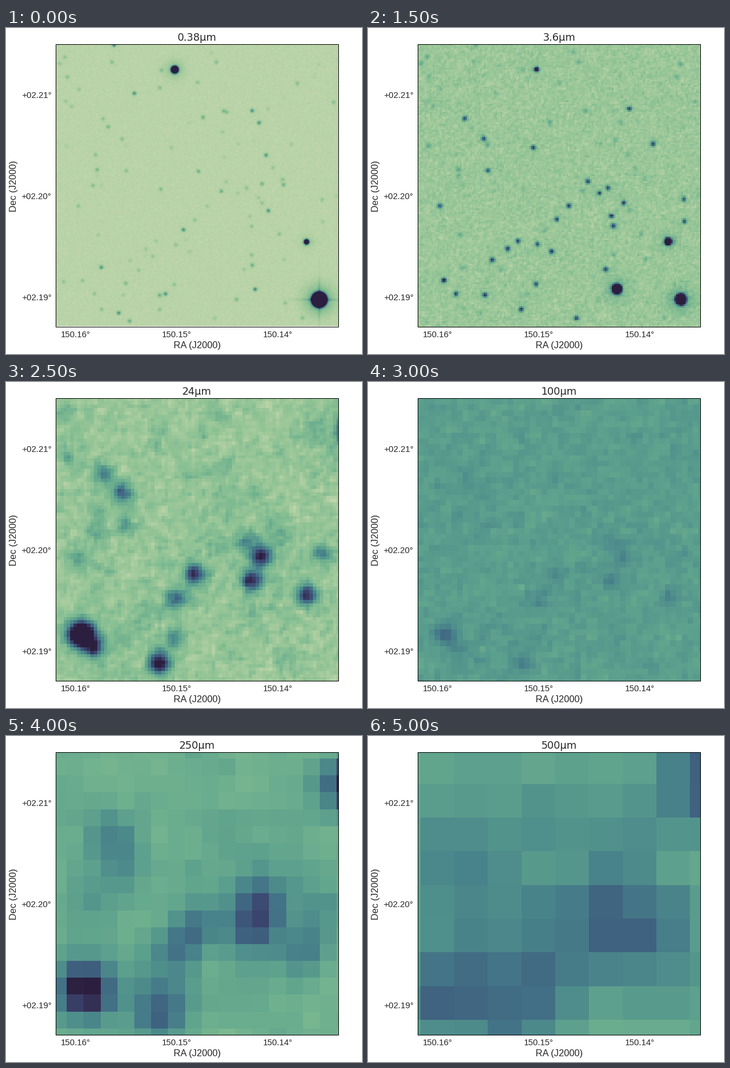
A matplotlib script for the animation above (5500 ms loop, 616 by 564 pixels).

```python
import numpy as np
import matplotlib.pyplot as plt
from matplotlib.animation import FuncAnimation
from matplotlib.colors import ListedColormap
from matplotlib.patches import Rectangle

W, H, DPI = 616, 564, 64
L, T, R, B = 86.5, 28.5, 575.5, 517.5
ANCHOR = 294.5, 287.5  # every detector grid has a cell centred here
INK = "#262626"

# wavelength in µm, cell size in pixels, background level, noise
BANDS = [
    (0.38, 1, .10, .012), (0.77, 1, .11, .015), (2.2, 1, .145, .022),
    (3.6, 2.92, .20, .03), (7.8, 2.92, .32, .095), (24, 5.83, .20, .035),
    (100, 9.72, .45, .02), (160, 14.58, .42, .03), (250, 29.17, .33, .018),
    (350, 40.5, .35, .02), (500, 58.33, .37, .025),
]

# Key objects; brightness is blue for stars, then near infrared, then dust.
STARS = [(541, 470, 40, 10), (519, 370, 2, 3.5), (291, 72, 4.5, 1.7),
         (430, 452, .45, 7), (186, 29, .6, .4)]
BLUE = [(425, 143), (437, 164), (449, 220), (164, 414), (275, 460),
        (306, 349), (453, 316), (221, 113), (194, 493)]
RED = [(285, 207), (493, 201), (380, 266), (400, 286), (347, 308),
       (421, 326), (547, 335), (259, 369), (241, 382), (317, 387),
       (214, 402), (411, 418), (202, 462), (360, 502), (452, 140)]
DUSTY = [(131, 437, 1.7), (152, 460, .6), (265, 487, .88), (290, 444, .3),
         (326, 332, .66), (293, 375, .45), (424, 343, .75), (442, 303, .72),
         (415, 277, .3), (519, 369, .64), (546, 297, .35), (200, 192, .45),
         (167, 157, .3), (207, 247, .25), (124, 308, .25), (606, 84, 2.6)]


def helix_map(start=0.5, rot=-0.75, hue=0.8, light=0.85, dark=0.15):
    x = np.linspace(light, dark, 256)
    amp = hue * x * (1 - x) / 2
    phi = 2 * np.pi * (start / 3 + rot * x)
    mix = np.array([[-0.14861, 1.78277], [-0.29227, -0.90649], [1.97294, 0]])
    rgb = x + amp * (mix @ np.array([np.cos(phi), np.sin(phi)]))
    return ListedColormap(np.clip(rgb.T, 0, 1))


def catalogue(n_faint=60):
    rng = np.random.default_rng(11)
    rows = [(x, y, u, k, 0) for x, y, u, k in STARS]
    rows += [(x, y, .4, .2, 0) for x, y in BLUE]
    rows += [(x, y, .1, 1, 0) for x, y in RED]
    rows += [(x, y, .15, .75, d) for x, y, d in DUSTY]
    for _ in range(n_faint):
        rows.append((rng.uniform(L, R), rng.uniform(T, B),
                     *rng.uniform(.03, (.28, .28, .1))))
    return rows


def flux(lam, u, k, d):
    """Brightness of one object, interpolated along its spectrum."""
    waves = np.log([.38, 2.2, 7.8, 24, 100, 250, 500])
    peaks = [u, k, .17 * k + .6 * d, d, .14 * d, .34 * d, .13 * d]
    return np.interp(np.log(lam), waves, peaks)


def blur(lam):
    """Seeing combined with the diffraction limit of the telescope."""
    mirror = 4 if lam < 3 else .85 if lam < 50 else 3.5
    return np.hypot(2.3, .42 * lam / mirror)


def edges(centre, lo, hi, cell):
    first = centre - (np.ceil((centre - lo) / cell - .5) + .5) * cell
    return first + cell * np.arange(np.ceil((hi - first) / cell) + 1)


def noise(rng, shape, std, passes):
    n = rng.normal(size=shape)
    for _ in range(passes):
        n = n + .35 * (np.roll(n, 1, 0) + np.roll(n, 1, 1))
    return n * std / n.std()


def blob(x, y, cx, cy, peak, s):
    return peak * np.outer(np.exp(-((y - cy) / s) ** 2 / 2),
                           np.exp(-((x - cx) / s) ** 2 / 2))


def spikes(x, y, cx, cy, tilt, peak, length, width=1.5):
    dx, dy = x[None, :] - cx, y[:, None] - cy
    c, s = np.cos(tilt), np.sin(tilt)
    a, b = dx * c + dy * s, dy * c - dx * s
    return sum(peak * np.exp(-abs(p) / length - (q / width) ** 2 / 2)
               for p, q in ((a, b), (b, a)))


def render(lam, cell, level, std):
    trim = 2 if cell == 1 else 0
    ex = edges(ANCHOR[0], 86, 576 - trim, cell)
    ey = edges(ANCHOR[1], 28, 518 - trim, cell)
    x, y = (ex[1:] + ex[:-1]) / 2, (ey[1:] + ey[:-1]) / 2
    sigma = blur(lam)
    rng = np.random.default_rng(int(lam * 100))
    img = level + noise(rng, (len(y), len(x)), std, round(sigma / cell))
    for cx, cy, *spectrum in catalogue():
        peak = flux(lam, *spectrum)
        s = sigma * (1 + .3 * np.log(max(peak, 1)))
        img += blob(x, y, cx, cy, peak, s)
        img += blob(x, y, cx, cy, min(.3, .03 * peak), 3.5 * s)
    if lam < 1:
        img += spikes(x, y, *STARS[0][:2], 0, .4, 18)
    elif lam < 3:
        img += spikes(x, y, *STARS[0][:2], np.pi / 4, 1, 9)
    return img, (ex[0], ex[-1], ey[-1], ey[0])


fig = plt.figure(figsize=(W / DPI, H / DPI), dpi=DPI, facecolor="white")
ax = fig.add_axes([0, 0, 1, 1])
ax.axis("off")


def label(x, y, text, px, font="Liberation Sans", ha="center", **kw):
    return ax.text(x, y, text, fontsize=px * 72 / DPI, family=font, color=INK,
                   ha=ha, va="baseline", **kw)


cmap = helix_map()
images = []
for band in BANDS:
    img, extent = render(*band)
    images.append(ax.imshow(img, extent=extent, cmap=cmap, vmin=0, vmax=1,
                            interpolation="nearest", aspect="auto",
                            visible=False))
ax.set_xlim(0, W)
ax.set_ylim(H, 0)

border = Rectangle((L, T), R - L, B - T, fill=False, ec="black",
                   lw=72 / DPI, snap=False, zorder=3)
ax.add_patch(border)
for im in images:
    im.set_clip_path(border)

title = label(330.5, 22, "", 17.6, "DejaVu Sans")
label(330.5, 554, "RA (J2000)", 16.3)
label(18, 273.5, "Dec (J2000)", 16.3, rotation=90, rotation_mode="anchor")
for k in range(3):
    label(120.5 + 175 * k, 535, f"150.{16 - k}°", 14.7)
    label(78.5, 121 + 175 * k, f"+02.{21 - k}°", 14.7, ha="right")


def update(i):
    for k, im in enumerate(images):
        im.set_visible(k == i)
    title.set_text(f"{BANDS[i][0]:g}µm")
    return [*images, title]


anim = FuncAnimation(fig, update, frames=len(BANDS), interval=500,
                     repeat=True, repeat_delay=0)
plt.show()
```
